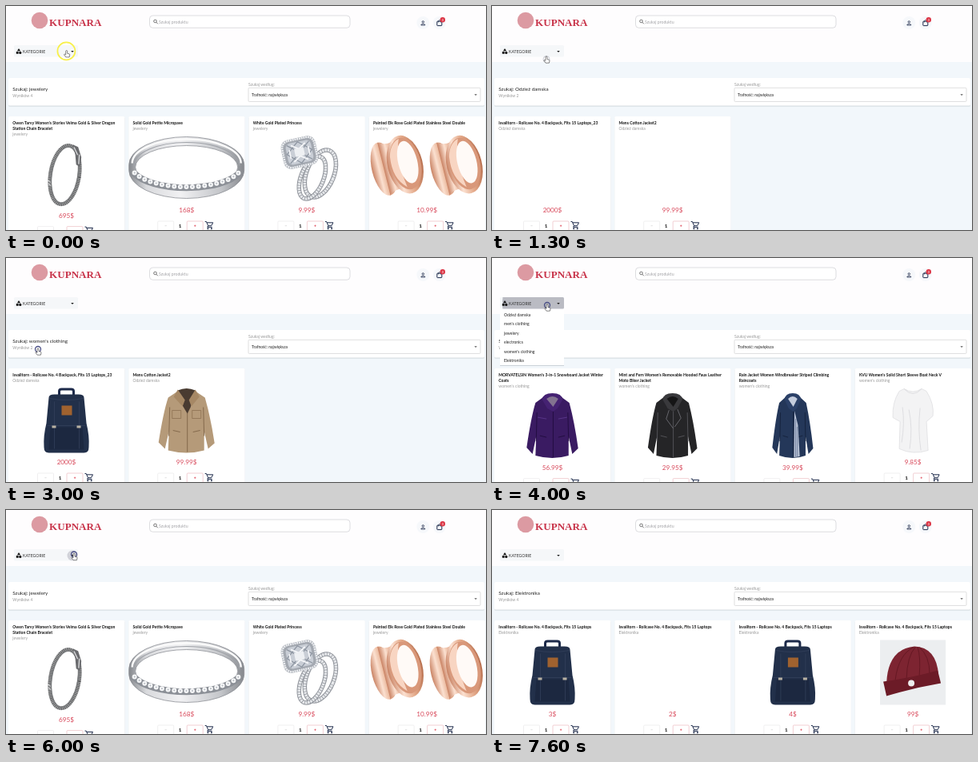
Recreate the animation shown at these times as an HTML page. Size 600 by 280 pixels, loop 9000 ms.

```html
<!DOCTYPE html>
<html lang="pl">
<head>
<meta charset="utf-8">
<title>Sklep</title>
<style>
html, body { margin: 0; width: 100%; height: 100%; overflow: hidden; background: #f2f7fb; }
svg { display: block; width: 600px; height: 280px; font-family: Lato, sans-serif; }
</style>
</head>
<body>
<svg id="stage" viewBox="0 0 600 280">
  <defs>
    <filter id="shadow" x="-5%" y="-10%" width="110%" height="130%">
      <feDropShadow dx="0" dy=".7" stdDeviation=".7" flood-color="#345" flood-opacity=".3"/>
    </filter>
    <linearGradient id="silver"><stop stop-color="#85888d"/><stop offset=".15" stop-color="#d9dadd"/><stop offset=".45" stop-color="#f1f1f3"/><stop offset=".8" stop-color="#c3c5c9"/><stop offset="1" stop-color="#85888d"/></linearGradient>
    <linearGradient id="rose"><stop stop-color="#c98263"/><stop offset=".3" stop-color="#fbe0d0"/><stop offset=".6" stop-color="#e3a888"/><stop offset="1" stop-color="#b8704f"/></linearGradient>
    <clipPath id="button"><rect x="10" y="49" width="80" height="14.5" rx="1.5"/></clipPath>
  </defs>
  <g id="base"></g><g id="live"></g>
</svg>
<script>
const RED = '#dc3545', NAVY = '#1d2a4a';
const path = (d, fill, more = '') => `<path d="${d}" fill="${fill}" ${more}/>`;
const line = (d, color, w = 1, more = '') => path(d, 'none', `stroke="${color}" stroke-width="${w}" ${more}`);
const rect = (x, y, w, h, fill, more = '') => `<rect x="${x}" y="${y}" width="${w}" height="${h}" fill="${fill}" ${more}/>`;
const circle = (x, y, r, fill, more = '') => `<circle cx="${x}" cy="${y}" r="${r}" fill="${fill}" ${more}/>`;
const oval = (x, y, rx, ry, fill, more = '') => `<ellipse cx="${x}" cy="${y}" rx="${rx}" ry="${ry}" fill="${fill}" ${more}/>`;
const loop = (x, y, rx, ry, color, w, more = '') => oval(x, y, rx, ry, 'none', `stroke="${color}" stroke-width="${w}" ${more}`);
const text = (x, y, s, size = 5.04, fill = '#222', more = '') =>
  `<text x="${x}" y="${y}" font-size="${size}" fill="${fill}" ${more}>${s.replace(/&/g, '&amp;')}</text>`;
const at = (x, y, s, more = '') => `<g transform="translate(${x} ${y}) ${more}">${s}</g>`;

// Product pictures: x is measured from the card's middle, y from 0 to 82
const coat = (fill, dark, width, extra) => `<g transform="scale(${width} 1)">` +
  path('M-11 4L-23 12Q-29 30-35 68L-27 76L-22 54L-23 78Q0 84 22 78L22 54L27 76L35 69Q30 36 23 12L11 4Z', fill) +
  line('M-21 24L-22 60M21 24L22 60M1 16V80M-17 53L-8 55M17 53L8 55', dark, 1) + extra + '</g>';

const hood = (fill, inner) => path('M-14 8Q-13 0 0 0Q13 0 14 8L7 19L1 23L-7 19Z', fill) +
  path('M-8 7Q0 1 8 7L1 17Z', inner);

const tunnel = x => at(x, 38,
  oval(-17, -1, 15, 34, 'url(#rose)') +
  path('M-17-35Q-4-26 10-36V36Q-4 22-17 33Z', 'url(#rose)') +
  oval(10, 0, 22, 37, 'url(#rose)') +
  oval(11, -1, 19, 33, '#d9987a') +
  path('M-6-14Q-2-30 10-33Q0-10 6 28Q-10 14-6-14Z', '#f8d5c2') +
  oval(14, -2, 12, 27, '#fffaf7'), 'rotate(-14)');

const band = (x, y, rx, ry) => loop(x, y, rx, ry, '#8f939a', 5.5, `transform="rotate(22 ${x} ${y})"`) +
  loop(x, y, rx, ry, '#e6e8eb', 3.5, `stroke-dasharray="2.6 .7" transform="rotate(22 ${x} ${y})"`);

const pics = {
  pack: line('M-9 12V4Q-9 1.5-6 1.5H6Q9 1.5 9 4V12', NAVY, 3) +
    path('M-22 12Q-22 8-15 8H15Q22 8 22 12L25 44Q29 60 28 74Q28 81 22 81H-22Q-28 81-28 74Q-29 60-25 44Z', '#22304a') +
    path('M-20 49H20L22 77H-22Z', '#1c2840') +
    line('M-21 13Q0 17 21 13M-24 47H24M-15 17V76M16 17V76', '#35435d', .7) +
    rect(-6, 22, 13, 12, '#a0622f') + rect(-18, 47, 5, 3, '#b9b2a3') + rect(13, 47, 5, 3, '#b9b2a3'),
  jacket: coat('#b59a79', '#84694c', 1,
    path('M-11 3Q0-2 11 3L5 24L1 32L-5 22Z', '#493b31') +
    path('M-11 2L-16 11L-5 23L-2 15ZM11 2L16 11L6 23L3 15Z', '#a68865') +
    line('M-18 28H-7V38H-18ZM18 28H7V38H18Z', '#8d7152', .8)),
  parka: coat('#3a1b62', '#220d40', .92, hood('#452272', '#837390') + line('M-20 30L-8 32M20 30L8 32', '#59378a')),
  leather: coat('#252527', '#55555a', .88, hood('#39393c', '#151516') + line('M-5 21L-9 32L1 44M7 20L12 31L3 42', '#6a6a70')),
  rain: coat('#243759', '#14213b', .73, hood('#2b4067', '#c5cddd') +
    path('M3 22L9 40L12 79L2 80Z', '#b8c2d5') + line('M5 32V79M8 42V79', '#44577c', .7)),
  tee: path('M-11 1Q0 8 11 1L17 4Q27 20 25 35L17 42L19 78Q0 84-17 76L-16 42L-25 37Q-26 18-17 4Z', '#f3f3f4', 'stroke="#dcdcde" stroke-width=".7"') +
    line('M-11 1Q0 13 11 1M-13 24Q-10 44-14 68M-5 27Q0 50-4 76M9 25Q6 52 10 78', '#d8d8dc', .8),
  bracelet: at(-2, 42, loop(0, 0, 18, 37, '#a4a5a6', 5) +
    loop(0, 0, 18, 37, '#58595b', 4.4, 'stroke-dasharray="1 1.1"') +
    loop(0, 0, 16.5, 35.5, '#77797b', 1) +
    path('M4-39L11-37L17-25L17-13L12-15L9-27Z', '#6a6b6e') + line('M6-36L12-27M14-28L15-16', '#d6d7d9', 1.4) +
    line('M-20 10L-16 12M-19 14L-15 16', '#e4e4e5', 1), 'rotate(9)'),
  eternity: path('M-72 36A72 35 0 0 1 72 36V43A72 35 0 0 1-72 43ZM-64 39A64 25 0 0 0 64 39A64 27 0 0 0-64 39Z', 'url(#silver)', 'fill-rule="evenodd" stroke="#8d9096" stroke-width=".8"') +
    line('M-68 34A68 30 0 0 1 68 34', '#fafafa', 2.5) + line('M-66 37A66 29 0 0 1 66 37', '#9fa2a8', 1.2) +
    line('M-66 46A70 28 0 0 0 66 46', '#8c9097', 8) +
    line('M-65 46A70 28 0 0 0 65 46', '#f6f7f8', 6, 'stroke-dasharray="0 7.6" stroke-linecap="round"') +
    line('M-65 46A70 28 0 0 0 65 46', '#b5b9c0', 2, 'stroke-dasharray="0 7.6" stroke-linecap="round"'),
  princess: band(17, 47, 17, 31) + band(7, 52, 14, 28) +
    at(-9, 20, rect(-22, -18, 44, 37, '#a3a8b0', 'rx="10"') +
      rect(-20.5, -16.5, 41, 34, 'none', 'rx="9" stroke="#eceef1" stroke-width="2.6" stroke-dasharray="2 .8"') +
      rect(-16, -13, 32, 27, '#c9ced6', 'rx="6"') +
      line('M-14-11L14 12M14-11L-14 12M0-13L16 0L0 14L-16 0Z', '#8d95a1', 1.2) +
      line('M-9-10L0-4L9-10M-9 11L0 5L9 11M-12-5V6M12-5V6', '#f8f9fb', 1.6) +
      path('M-6-5H6V5H-6Z', '#eef0f3'), 'rotate(-12)'),
  tunnels: tunnel(-37) + tunnel(37),
  beanie: rect(-41, 0, 82, 81, '#eceef0') +
    path('M-33 54Q-31 11 2 8Q29 9 32 43Z', '#7d2431') +
    line('M-22 50Q-18 18 1 9M-8 48Q-7 20 3 9M8 45Q10 22 6 9M21 43Q21 20 8 9', '#651823', 1) +
    path('M-37 52Q0 47 31 38L35 54Q0 60-33 70Z', '#6c1b27') + circle(-2, 54, 4, '#eee')
};

const pack = 'Isvalltorn - Rollcase No. 4 Backpack, Fits 15 Laptops';
const lists = {
  jewelery: ['jewelery',
    ["Owen Tarvy Women's Stories Velma Gold & Silver Dragon|Station Chain Bracelet", '695$', 'bracelet'],
    ['Solid Gold Petite Micropave', '168$', 'eternity'],
    ['White Gold Plated Princess', '9.99$', 'princess'],
    ['Painted Elk Rose Gold Plated Stainless Steel Double', '10.99$', 'tunnels']],
  ladies: ['Odzież damska',
    [pack + '_23', '2000$', 'pack'],
    ['Mens Cotton Jacket2', '99.99$', 'jacket']],
  women: ["women's clothing",
    ["MORVATELSIN Women's 3-in-1 Snowboard Jacket Winter|Coats", '56.99$', 'parka'],
    ["Mint and Fern Women's Removable Hooded Faux Leather|Moto Biker Jacket", '29.95$', 'leather'],
    ['Rain Jacket Women Windbreaker Striped Climbing|Raincoats', '39.99$', 'rain'],
    ["KVU Women's Solid Short Sleeve Boat Neck V", '9.85$', 'tee']],
  electro: ['Elektronika', [pack, '3$', 'pack'], [pack, '2$'], [pack, '4$', 'pack'], [pack, '99$', 'beanie']]
};

const cart = line('M-5-4.5H-3.3L-1 .7H3L5-3.2H-2.6M-1 .7L-2 2.4H4', NAVY, 1) + circle(-1.3, 4.2, 1, NAVY) + circle(3.2, 4.2, 1, NAVY);

function card([title, price, pic], cat, i, loaded) {
  const left = 3 + i * 150.2, mid = left + 72.5, lines = title.split('|'), dy = (lines.length - 1) * 6.6;
  return rect(left, 138, 145.5, 150, '#fff', 'rx="1.5" filter="url(#shadow)"') +
    lines.map((s, k) => text(left + 5.3, 148.2 + k * 6.6, s, 5.04, '#111', 'font-weight="700"')).join('') +
    text(left + 5.3, 155.2 + dy, cat, 5.04, '#999') +
    (loaded && pic ? at(mid, 162.5 + dy, pics[pic]) : '') +
    at(mid, dy, text(0, 258.2, price, 8.2, '#d8485a', 'text-anchor="middle"') +
      rect(-36, 269, 20, 12, '#fff', 'rx="1" stroke="#e6e4e6" stroke-width=".6"') +
      rect(.5, 269, 20, 12, '#fff', 'rx="1" stroke="#eab0b7" stroke-width=".6"') +
      line('M-27.2 274.7H-24.8', '#ccc', .6) + line('M9.4 274.7H11.8M10.6 273.5V275.9', RED, .6) +
      text(-8, 277, '1', 6.3, '#111', 'text-anchor="middle" font-weight="700"') + at(28, 274, cart));
}

const items = ['Odzież damska', "men's clothing", 'jewelery', 'electronics', "women's clothing", 'Elektronika'];
const menu = hover => rect(10, 65, 80, 69, '#fff', 'filter="url(#shadow)"') +
  items.map((s, i) => (i === hover ? rect(10, 65 + i * 11.5, 80, 11.5, RED) : '') +
    text(15, 72.7 + i * 11.5, s, 5.04, i === hover ? '#6a0f1b' : '#222')).join('');

document.getElementById('base').innerHTML =
  rect(0, 0, 600, 70, '#fefdfe') +
  circle(42, 18, 10.3, '#dc9aa2') +
  text(54, 24.8, 'KUPNARA', 13.1, '#c8344a', 'font-weight="700" style="font-family:\'Liberation Serif\',serif"') +
  rect(179.5, 12, 250.5, 15.3, '#fff', 'rx="4" stroke="#cfcfd3" stroke-width=".7"') +
  circle(186.5, 19, 1.8, 'none', 'stroke="#555" stroke-width=".8"') + line('M187.8 20.3L189.8 22.3', '#555', .9) +
  text(191, 21.6, 'Szukaj produktu', 5.2, '#a2a2a6') +
  circle(521.3, 21, 8, '#f6f8fb') + circle(541.8, 21, 8, '#f6f8fb') +
  circle(521.3, 19.9, 1.2, 'none', `stroke="${NAVY}" stroke-width=".8"`) +
  line('M518.9 24V23.2Q521.3 21.4 523.7 23.2V24Z', NAVY, .8) +
  rect(538.8, 19.2, 6, 5.4, 'none', `rx=".6" stroke="${NAVY}" stroke-width="1"`) +
  line('M540.2 20.6V18.8Q541.8 16.4 543.4 18.8V20.6', NAVY, .8) +
  circle(545.8, 17.3, 3.2, RED) + text(545.8, 18.7, '0', 3.8, '#fff', 'text-anchor="middle"') +
  rect(10, 49, 80, 14.5, '#f5f7f9', 'rx="1.5"') +
  rect(3, 90, 595, 34.5, '#fff', 'rx="1.5" filter="url(#shadow)"') +
  text(303, 100, 'Szukaj według:', 5.04, '#999') +
  rect(303, 102.3, 290, 17.2, '#fff', 'rx="1.3" stroke="#c9c9cc" stroke-width=".6"') +
  text(307, 112.6, 'Trafność: największa') + path('M585.4 110.3H588.8L587.1 112Z', '#555');

const buttonLabel = path('M16 53L18.1 56.3H13.9Z', '#111') + rect(12.8, 57, 2.8, 2.8, '#111') + circle(17.8, 58.4, 1.6, '#111') +
  text(21, 58.5, 'KATEGORIE', 5.2, '#333') + path('M81.2 56H84.8L83 57.9Z', '#222');

// [time, searched name, product list, pictures loaded]
const views = [
  [0, 'jewelery', 'jewelery', 1], [1000, 'Odzież damska', 'ladies', 0], [1700, 'Odzież damska', 'ladies', 1],
  [2900, "women's clothing", 'ladies', 1], [3500, "women's clothing", 'women', 0], [3700, "women's clothing", 'women', 1],
  [5200, 'jewelery', 'women', 1], [5400, 'jewelery', 'jewelery', 0], [5500, 'jewelery', 'jewelery', 1],
  [7000, 'Elektronika', 'jewelery', 1], [7200, 'Elektronika', 'electro', 0], [7300, 'Elektronika', 'electro', 1]
];
// [button pressed, item chosen]
const visits = [[400, 1000], [1700, 2900], [3900, 5200], [6000, 7000]];
// [time, x, y] of the fingertip
const moves = [
  [0, 75.7, 55.7], [500, 75.7, 55.7], [800, 48, 70], [1000, 48, 70], [1300, 68, 63], [1400, 68, 63], [1700, 72, 55], [1800, 72, 55],
  [2300, 42, 115], [3000, 40, 113], [3400, 40, 113], [3900, 69, 58], [4300, 69, 58], [4900, 51, 91], [5200, 51, 92],
  [6000, 85, 54.5], [6100, 85, 54.5], [6600, 40, 128], [7000, 40, 127], [7500, 62, -14], [9000, 62, -14]
];
const hand = path('M-1 .9A1 1 0 0 1 1 .9V3.6L3.3 4.2Q4.2 4.5 4 5.5L3.4 8.2H-.9L-3.2 5Q-2.8 3.8-1 5.2Z', '#fff', 'stroke="#333" stroke-width=".6"');

function pointer(t) {
  const i = moves.findIndex(m => m[0] > t), [t0, x0, y0] = moves[i - 1], [t1, x1, y1] = moves[i];
  const p = (t - t0) / (t1 - t0), e = p * p * (3 - 2 * p);
  return [x0 + (x1 - x0) * e, y0 + (y1 - y0) * e];
}

function ring(t) {
  if (t < 400) return circle(-.3, .7, 11, 'none', 'stroke="#f8f04a" stroke-width="1.7"');
  if (t >= 1300 && t < 1500) return circle(0, 3.5, 4, 'none', 'stroke="#c9ccd4" stroke-width="1"');
  const pressed = visits.flat().some(c => t >= c && t < c + 300);
  return pressed ? circle(0, 1, 3.5, 'none', 'stroke="#4a4f86" stroke-width="1.3"') : '';
}

function scene(t) {
  const [, name, key, loaded] = views.findLast(v => v[0] <= t);
  const [cat, ...goods] = lists[key];
  const [x, y] = pointer(t);
  const open = visits.some(([a, b]) => t > a && t < b);
  const press = visits.find(([a]) => t >= a && t < a + 400);
  const age = press ? (t - press[0]) / 100 : 0;
  const ripple = press ? `<g clip-path="url(#button)">${circle(83, 57, age ? 60 + age * 10 : 6.5, '#667', `opacity="${[.25, .42, .25, .1][age]}"`)}</g>` : '';
  return text(8.3, 105.6, 'Szukaj: ' + name, 6.3) + text(8.3, 114.2, 'Wyników ' + goods.length, 5.04, '#999') +
    goods.map((g, i) => card(g, cat, i, loaded)).join('') +
    ripple + buttonLabel + (open ? menu(Math.floor((y - 63) / 11.5)) : '') +
    at(x, y, ring(t) + hand);
}

const live = document.getElementById('live');
let shown = -1;
function tick() {
  const t = Math.floor(performance.now() % 9000 / 100) * 100;
  if (t !== shown) live.innerHTML = scene(shown = t);
  requestAnimationFrame(tick);
}
tick();
</script>
</body>
</html>
```
